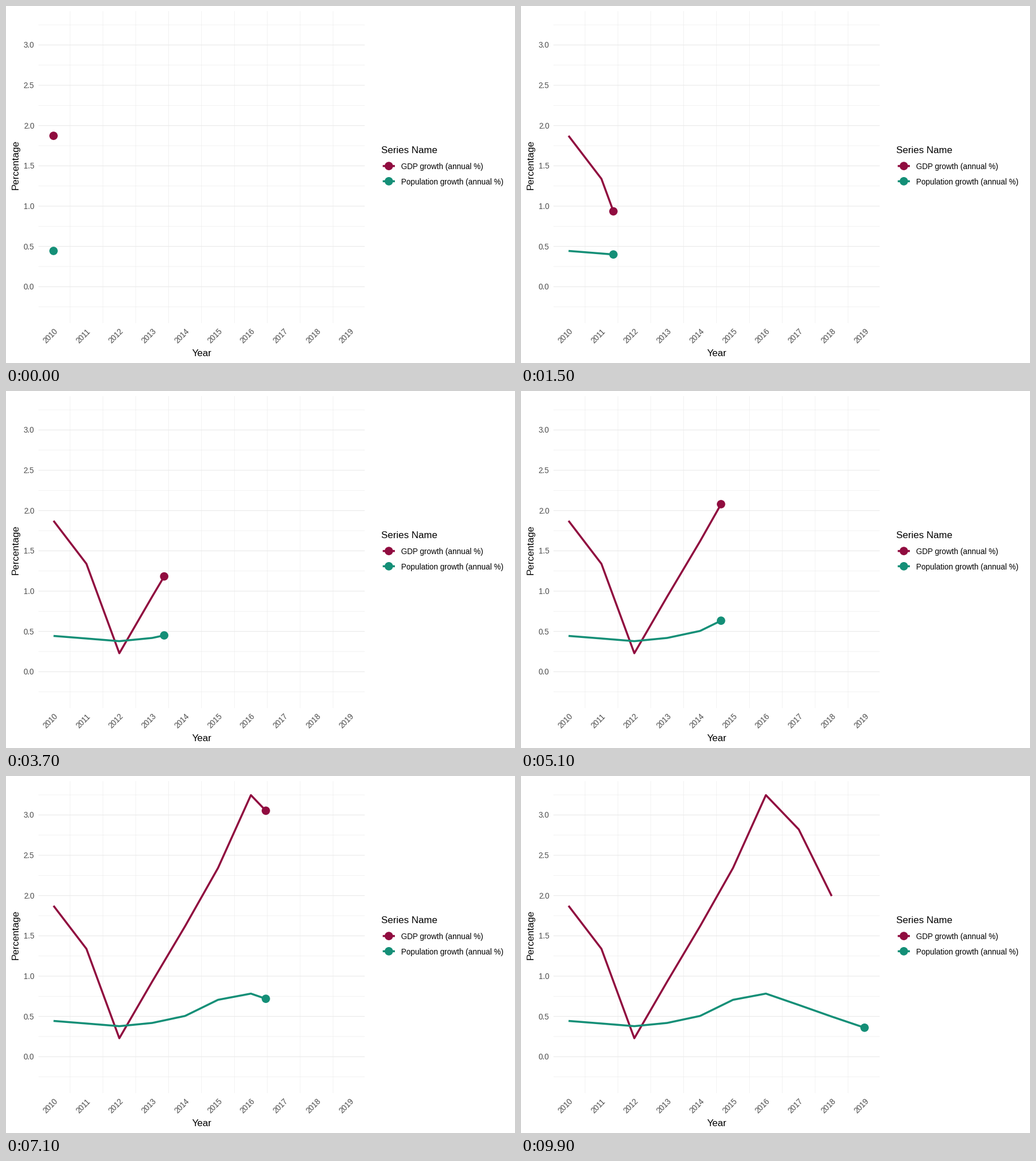
A matplotlib script that plays this animation: 894 by 626 pixels, repeating every 10000 ms.

```python
import numpy as np
import matplotlib.pyplot as plt
from matplotlib.animation import FuncAnimation
from matplotlib.patches import Circle

W, H, DPI = 894, 626, 100
FRAMES, STEPS = 100, 11          # eleven steps per year
LEFT, RIGHT, TOP, BOTTOM = 57, 630, 9, 556
GREY, GRID = "#4D4D4D", "#EBEBEB"
TITLE, SMALL = 17, 13.6
LINE, RADIUS = 3.5, 7.35

YEARS = np.arange(2010, 2020)
SERIES = [
    ("GDP growth (annual %)", "#900C3F",
     [1.873, 1.339, 0.229, 0.933, 1.620, 2.342, 3.247, 2.821, 1.994]),
    ("Population growth (annual %)", "#148F77",
     [0.444, 0.412, 0.379, 0.419, 0.506, 0.706, 0.783, 0.642, 0.498, 0.360]),
]

plt.rcParams["font.family"] = "Liberation Sans"


def pt(px):
    return px * 72 / DPI


def x_pos(i):
    return 83.5 + 57.77 * i


def y_pos(v):
    return 492.2 - 141.27 * v


fig = plt.figure(figsize=(W / DPI, H / DPI), dpi=DPI, facecolor="white")
ax = fig.add_axes([0, 0, 1, 1])
ax.set_xlim(0, W)
ax.set_ylim(H, 0)
ax.axis("off")


def label(x, y, text, size=SMALL, color="black", ha="left", angle=0):
    ax.text(x, y, text, fontsize=pt(size), color=color, ha=ha,
            va="baseline", rotation=angle, rotation_mode="anchor")


def grid_line(xs, ys, width):
    ax.plot(xs, ys, color=GRID, lw=pt(width), solid_capstyle="butt",
            snap=False, zorder=1)


def stroke(color, xs=(), ys=(), z=3):
    return ax.plot(xs, ys, color=color, lw=pt(LINE), solid_capstyle="butt",
                   solid_joinstyle="round", snap=False, zorder=z)[0]


def dot(color, x=0, y=0, z=5):
    return ax.add_patch(Circle((x, y), RADIUS, fc=color, lw=0,
                               snap=False, zorder=z))


# Grid and axes
for v in np.arange(-0.25, 3.5, 0.5):
    grid_line([LEFT, RIGHT], [y_pos(v)] * 2, 0.62)
for i in range(9):
    grid_line([x_pos(i + 0.5)] * 2, [TOP, BOTTOM], 0.62)
for v in np.arange(0, 3.25, 0.5):
    grid_line([LEFT, RIGHT], [y_pos(v)] * 2, 1.23)
    label(49.7, y_pos(v) + 5, f"{v:.1f}", color=GREY, ha="right")
for i, year in enumerate(YEARS):
    label(x_pos(i) - 2.8, 581.3, str(year), color=GREY, ha="center", angle=45)
label(343.5, 614, "Year", TITLE, ha="center")
label(21.5, 278.7, "Percentage", TITLE, ha="center", angle=90)

# Legend
label(659, 257.8, "Series Name", TITLE)
for k, (name, color, _) in enumerate(SERIES):
    y = 280.6 + 26.7 * k
    stroke(color, [661.7, 683], [y, y])
    dot(color, 672.4, y)
    label(694.4, y + 5.7, name)

lines = [stroke(color, z=3 + k) for k, (_, color, _) in enumerate(SERIES)]
dots = [dot(color, z=5 + k) for k, (_, color, _) in enumerate(SERIES)]


def update(frame):
    t = frame / STEPS
    for (_, _, values), line, head in zip(SERIES, lines, dots):
        last = len(values) - 1
        now = min(t, last)
        idx = np.append(np.arange(np.ceil(now)), now)
        xs = x_pos(idx)
        ys = y_pos(np.interp(idx, np.arange(last + 1), values))
        line.set_data(xs, ys)
        head.set_center((xs[-1], ys[-1]))
        head.set_visible(t <= last)   # the marker goes once data ends
    return lines + dots


anim = FuncAnimation(fig, update, frames=FRAMES, interval=100,
                     repeat=True, repeat_delay=0, blit=False)
plt.show()
```
